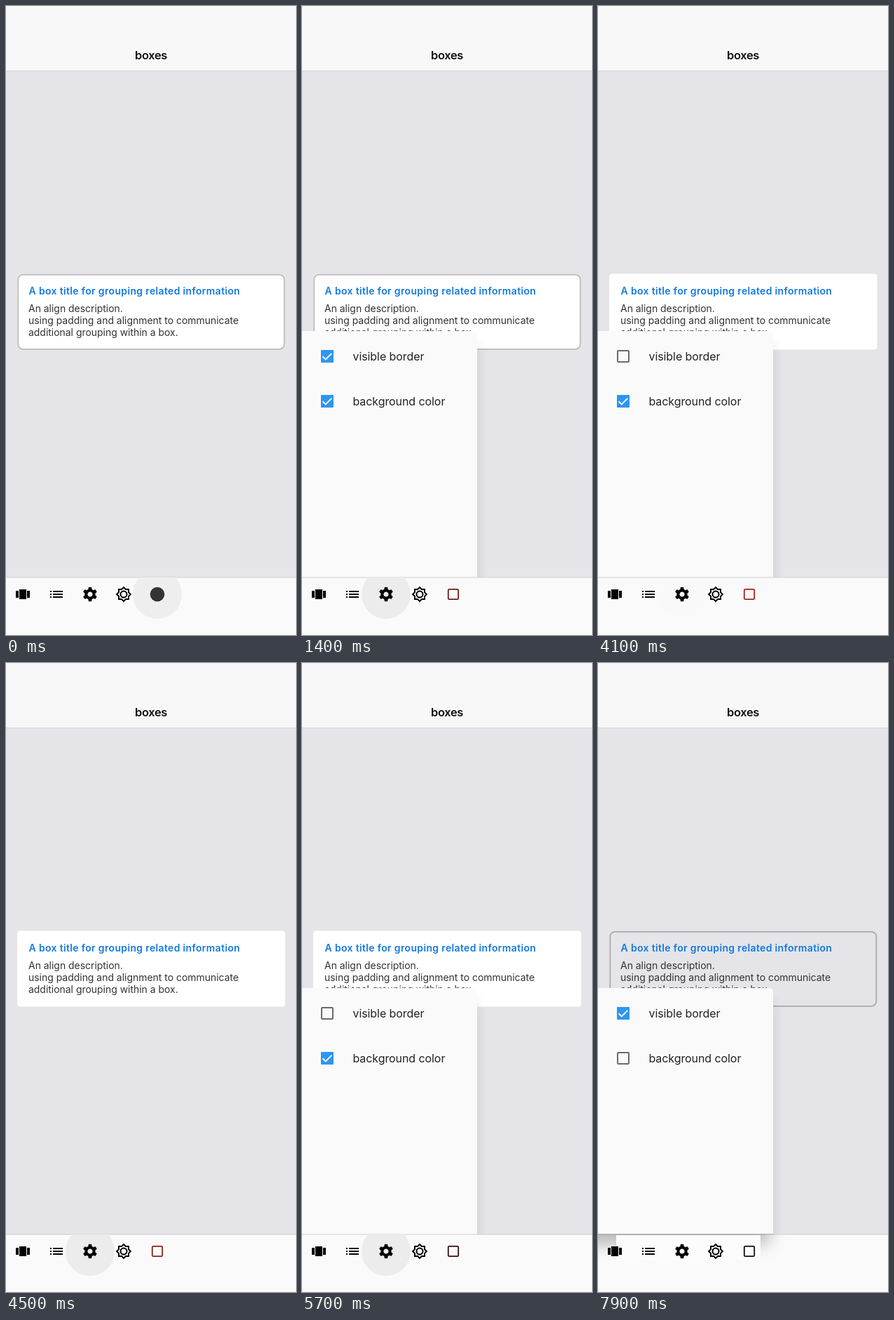
Recreate the animation shown at these times as an HTML page. Size 414 by 896 pixels, loop 8000 ms.

```html
<!DOCTYPE html>
<html lang="en">
<head>
<meta charset="utf-8">
<title>Boxes</title>
<style>
  html, body { margin: 0; width: 100%; height: 100%; overflow: hidden; background: #e4e4e9; }
  svg { display: block; width: 414px; height: 896px; }
  text { font: 14px Inter, Roboto, sans-serif; fill: #333; letter-spacing: -.03px; }
  .heading { font-size: 16.5px; font-weight: 600; letter-spacing: -.4px; fill: #111; text-anchor: middle; }
  .title { font-weight: 600; letter-spacing: .34px; fill: #127ae0; }
  .label { font-size: 16px; letter-spacing: -.08px; fill: #222; }

  .anim { animation: 8s linear infinite; }
  .hard { animation-timing-function: step-end; }
  .border { animation-name: border; }
  .plain { animation-name: plain; }
  .fill { animation-name: fill; }
  .tick1 { animation-name: tick1; }
  .tick2 { animation-name: tick2; }
  .drawer { animation-name: slide; animation-timing-function: cubic-bezier(.2, .6, .3, 1); }
  .bar-shadow { animation-name: barShadow; }
  .box-halo { animation-name: boxHalo; }
  .gear-halo { animation-name: gearHalo; }
  .dot { animation-name: dot; }
  .square { animation-name: square; }
  .tile { animation-name: tile; }
  .strip { animation-name: strip; }

  @keyframes border { 0%, 81.25% { opacity: 1 } 31.25% { opacity: 0 } 100% { opacity: 1 } }
  @keyframes plain { 0%, 81.25% { opacity: 0 } 31.25% { opacity: 1 } 100% { opacity: 0 } }
  @keyframes fill { 0% { opacity: 1 } 93.75%, 100% { opacity: 0 } }
  @keyframes tick1 { 0%, 32.5%, 83.1%, 100% { opacity: 1 } 35%, 81.25% { opacity: 0 } }
  @keyframes tick2 { 0%, 93.75% { opacity: 1 } 95.6%, 100% { opacity: 0 } }
  @keyframes slide {
    0%, 14.375%, 55%, 68.125% { transform: translateY(370px) }
    17.25%, 51.875%, 71%, 100% { transform: none }
  }
  @keyframes barShadow { 0%, 51.25% { opacity: 0 } 25%, 80.6%, 100% { opacity: 1 } }
  @keyframes boxHalo { 0%, 12.5% { opacity: 1 } 15%, 100% { opacity: 0 } }
  @keyframes gearHalo {
    0%, 12.5%, 21.875%, 51.25%, 60.6%, 67.5%, 76.875%, 100% { opacity: 0 }
    13.75%, 18.75%, 52.5%, 57.5%, 68.75%, 73.75% { opacity: 1 }
  }
  @keyframes dot { 0%, 3.75% { opacity: 1 } 6%, 100% { opacity: 0 } }
  @keyframes square {
    0%, 3.75% { opacity: 0; stroke: #333 }
    6% { opacity: 1; stroke: #301a1a }
    17.5% { stroke: #6e1f1f }
    35%, 45% { stroke: #c8202f }
    56.25% { stroke: #86251f }
    71.25% { stroke: #321210 }
    82.5%, 92% { stroke: #c8202f }
    95%, 100% { opacity: 1; stroke: #111 }
  }
  @keyframes tile { 0%, 51.25% { opacity: 0 } 33.75%, 82.5%, 100% { opacity: 1 } }
  @keyframes strip { 0% { opacity: 0 } 93.75%, 100% { opacity: 1 } }
</style>
</head>
<body>
<svg viewBox="0 0 414 896">
  <defs>
    <clipPath id="above"><path d="M0 93H414V814H0z"/></clipPath>
    <clipPath id="below"><path d="M0 814H414V896H0z"/></clipPath>
    <filter id="soft" x="-30%" y="-30%" width="160%" height="160%"><feGaussianBlur stdDeviation="9"/></filter>
    <filter id="wide" x="-30%" y="-100%" width="160%" height="300%"><feGaussianBlur stdDeviation="12"/></filter>
    <g id="empty">
      <rect x="28" y="491" width="16" height="16" rx="1" fill="none" stroke="#6b6b6b" stroke-width="2"/>
    </g>
    <g id="ticked">
      <rect x="27" y="490" width="18" height="18" rx="1" fill="#2d96f0"/>
      <path d="M29.5 499.2 33.8 503.4 42.3 494.9" fill="none" stroke="#fff" stroke-width="2"/>
    </g>
    <path id="tooth" d="M-3.6-6 -2.4-7.1 -1.9-9.9H1.9L2.4-7.1 3.6-6z" stroke="#000" stroke-width=".4" stroke-linejoin="round"/>
  </defs>

  <rect width="414" height="896" fill="#e4e4e9"/>
  <rect width="414" height="92" fill="#f8f8f8"/>
  <rect y="92" width="414" height="1" fill="#d4d4d6"/>
  <text class="heading" x="207" y="76">boxes</text>

  <g class="anim hard fill" fill="#fff">
    <rect class="anim hard border" x="16.5" y="382" width="381.5" height="107.5" rx="8"/>
    <rect class="anim hard plain" x="16" y="381.5" width="382.5" height="108" rx="4"/>
  </g>
  <rect class="anim hard border" x="17.3" y="382.8" width="380" height="106" rx="7" fill="none" stroke="#000" stroke-opacity=".25" stroke-width="1.8"/>
  <text class="title" x="32.5" y="411">A box title for grouping related information</text>
  <text x="32" y="436">An align description.</text>
  <text x="32" y="453">using padding and alignment to communicate</text>
  <text x="32" y="470">additional grouping within a box.</text>

  <g clip-path="url(#above)">
    <g class="anim drawer">
      <rect x="-40" y="482" width="290" height="400" fill="#000" opacity=".11" filter="url(#soft)"/>
      <path d="M0 463H244Q250 463 250 469V860H0z" fill="#fafafa"/>
      <use href="#empty"/>
      <use href="#ticked" class="anim tick1"/>
      <text class="label" x="72.5" y="505">visible border</text>
      <use href="#empty" y="64"/>
      <use href="#ticked" y="64" class="anim tick2"/>
      <text class="label" x="72.5" y="569">background color</text>
    </g>
  </g>

  <rect y="814" width="414" height="82" fill="#fafafa"/>
  <rect y="813.5" width="414" height="1" fill="#d2d2d5"/>
  <g clip-path="url(#below)">
    <circle class="anim box-halo" cx="216" cy="838" r="35" fill="#eee"/>
    <circle class="anim gear-halo" cx="120" cy="838" r="35" fill="#ebeceb"/>
    <g class="anim hard bar-shadow">
      <rect x="-40" y="740" width="284" height="88" fill="#000" opacity=".27" filter="url(#wide)"/>
    </g>
  </g>
  <rect class="anim hard tile" x="207" y="826" width="25" height="25" fill="#fff"/>
  <rect class="anim hard strip" x="26" y="815" width="206" height="36" fill="#fcfcfc"/>
  <g class="anim hard bar-shadow"><rect y="813" width="250" height="1" fill="#b4b4b6"/></g>

  <path transform="translate(12 826)" d="M2 7h4v10H2zM7 5h10v14H7zM18 7h4v10h-4z"/>
  <path transform="translate(60 826)" d="M3 7h2v2H3zM3 11h2v2H3zM3 15h2v2H3zM7 7h14v2H7zM7 11h14v2H7zM7 15h14v2H7z"/>
  <g transform="translate(120 838)">
    <circle r="5.4" fill="none" stroke="#000" stroke-width="3.6"/>
    <use href="#tooth"/>
    <use href="#tooth" transform="rotate(60)"/>
    <use href="#tooth" transform="rotate(120)"/>
    <use href="#tooth" transform="rotate(180)"/>
    <use href="#tooth" transform="rotate(240)"/>
    <use href="#tooth" transform="rotate(300)"/>
  </g>
  <g transform="translate(168 838)" fill="none" stroke="#000" stroke-width="2">
    <path d="M7-2.9V-7H2.9L0-9.9 -2.9-7H-7V-2.9L-9.9 0 -7 2.9V7H-2.9L0 9.9 2.9 7H7V2.9L9.9 0z"/>
    <circle r="4.5"/>
  </g>
  <circle class="anim dot" cx="216" cy="838" r="10.3" fill="#333"/>
  <rect class="anim square" x="208.8" y="830.8" width="14.4" height="14.4" rx="1.5" fill="none" stroke-width="1.8"/>
</svg>
</body>
</html>
```
